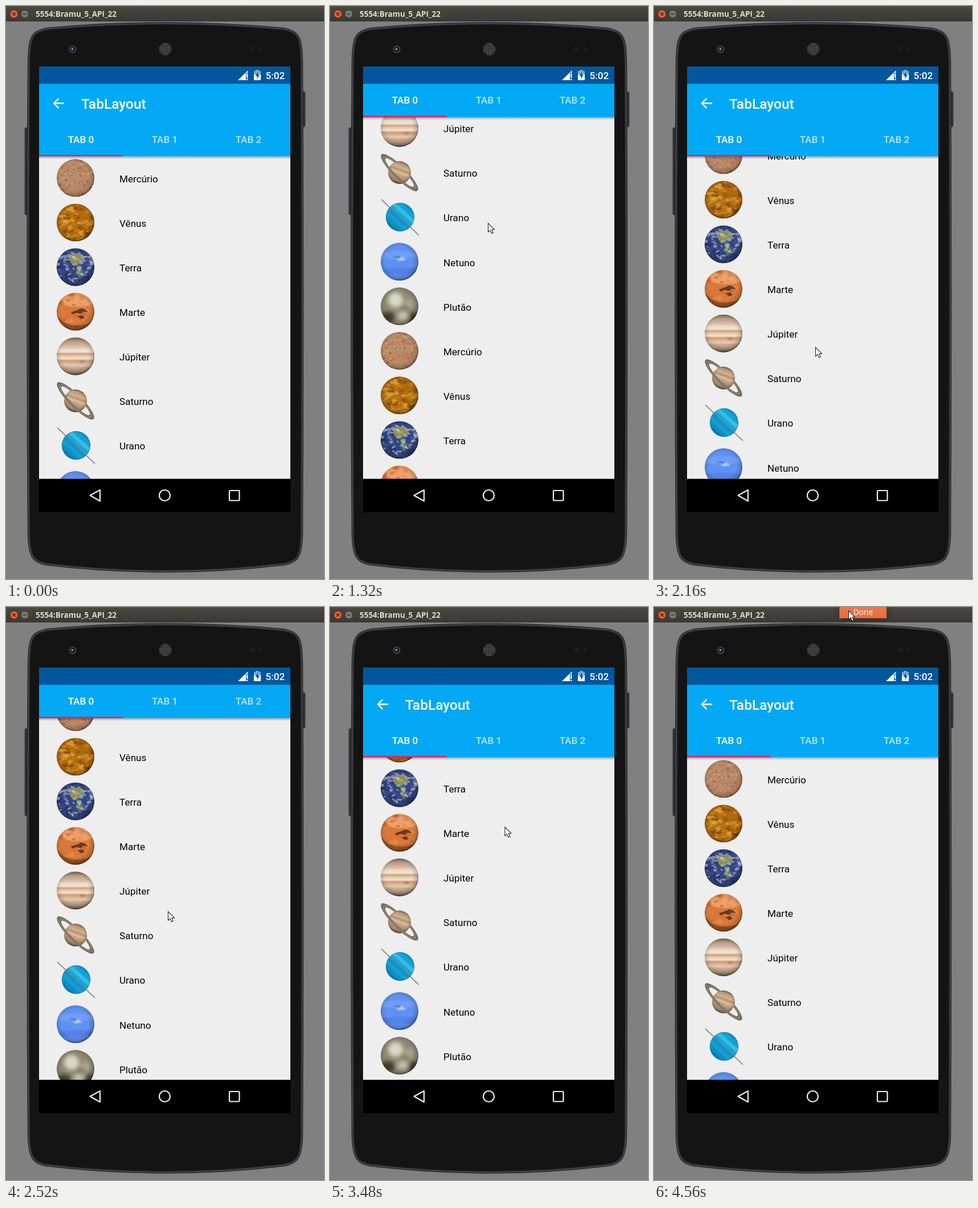
Animation of 558x1004 px, one loop 4680 ms. Source, as an HTML page:

```html
<!DOCTYPE html>
<html lang="pt">
<head>
<meta charset="utf-8">
<title>TabLayout</title>
<style>
  html, body { margin: 0; width: 100%; height: 100%; overflow: hidden; background: #808080; }
  svg { display: block; width: 100%; height: 100%; }
  text { font-family: Roboto, sans-serif; font-size: 17.15px; }
  .medium { font-weight: 500; fill: #fff; }
  .system { font-family: "Open Sans", sans-serif; }
</style>
</head>
<body>
<svg id="stage" viewBox="0 0 558 1004"></svg>
<script>
const STEP = 120, LOOP = 4680, ROW = 78.1, BAR = 68.6;
const names = ["Mercúrio", "Vênus", "Terra", "Marte", "Júpiter", "Saturno", "Urano", "Netuno", "Plutão"];

// Keys are [step, values...]; values between keys are linear.
const scrollKeys = [
  [7, 0], [8, -75.4], [9, -175], [10, -300], [11, -400], [12, -446], [13, -455.6], [14, -451],
  [15, -435], [16, -340], [17, -170], [18, -40], [19, 0], [20, -11], [21, -117], [22, -215],
  [23, -340], [24, -455], [25, -500.4], [26, -499], [27, -481], [28, -360], [29, -140], [30, 0]
];
const cursorKeys = [
  [1, 184, 632], [3, 309, 732], [5, 276, 725], [7, 273, 712], [8, 273, 617], [11, 277, 380],
  [12, 278, 348], [14, 280, 361], [15, 280, 378], [17, 282, 540], [19, 284, 655], [20, 284, 640],
  [21, 284, 533], [23, 291, 390], [25, 297, 352], [26, 298, 362], [27, 299, 380], [28, 303, 450],
  [30, 310, 320], [32, 321, 63], [34, 325, 30], [36, 318, 17], [38, 341, 6]
];
const glowKeys = [[29.9, 0], [30, 80], [31, 60], [32, 37], [33, 16], [34, 0]];

function sample(keys, n) {
  if (n <= keys[0][0]) return keys[0].slice(1);
  const i = keys.findIndex(k => k[0] >= n);
  if (i < 0) return keys[keys.length - 1].slice(1);
  const a = keys[i - 1], b = keys[i], f = (n - a[0]) / (b[0] - a[0]);
  return a.slice(1).map((v, j) => v + (b[j + 1] - v) * f);
}

function random(seed) {
  return () => (seed = (seed * 16807) % 2147483647) / 2147483647;
}

const circle = (x, y, r, attrs) => `<circle cx="${x}" cy="${y}" r="${r}" ${attrs}/>`;
const rect = (x, y, w, h, attrs) => `<rect x="${x}" y="${y}" width="${w}" height="${h}" ${attrs}/>`;
const path = (d, attrs) => `<path d="${d}" ${attrs}/>`;
const oval = (x, y, rx, ry, fill) => `<ellipse cx="${x}" cy="${y}" rx="${rx}" ry="${ry}" fill="${fill}"/>`;
const text = (x, y, s, attrs = "") => `<text x="${x}" y="${y}" ${attrs}>${s}</text>`;
const stops = list => list.map(([o, c, a = 1]) => `<stop offset="${o}" stop-color="${c}" stop-opacity="${a}"/>`).join("");
const vertical = (id, list) => `<linearGradient id="${id}" x2="0" y2="1">${stops(list)}</linearGradient>`;

// Soft blotches scattered over a disc.
function blotches(seed, count, size, colors) {
  const rnd = random(seed);
  let out = "";
  for (let i = 0; i < count; i++) {
    const a = rnd() * 6.283, d = 32 * Math.sqrt(rnd()), s = size * (.4 + rnd()), tilt = rnd() * 70 - 35;
    out += `<ellipse transform="translate(${(d * Math.cos(a)).toFixed(1)} ${(d * Math.sin(a)).toFixed(1)}) rotate(${tilt.toFixed()})"
      rx="${s.toFixed(1)}" ry="${(s * (.35 + rnd() * .5)).toFixed(1)}" fill="${colors[i % colors.length]}" opacity=".55"/>`;
  }
  return out;
}

function bands(r, list) {
  const h = 2 * r / list.length;
  return list.map((c, i) => rect(-r, -r + i * h, 2 * r, h + .5, `fill="${c}"`)).join("");
}

const globe = (base, detail, blur = "soft") =>
  `<g clip-path="url(#disc)">${circle(0, 0, 33.2, `fill="${base}"`)}
  <g filter="url(#${blur})">${detail}</g>${circle(0, 0, 33.2, 'fill="url(#limb)"')}</g>`;

// One half of a flat ring: far side with sweep 1, near side with sweep 0.
const halfRing = sweep => `<g transform="rotate(45)">` +
  path(`M-45 0A45 11 0 0 ${sweep} 45 0H35A35 7 0 0 ${1 - sweep}-35 0Z`, 'fill="#746a60"') +
  path(`M-39 0A39 9 0 0 ${sweep} 39 0`, 'fill="none" stroke="#94887a" stroke-width="1.5"') + `</g>`;

const planets = [
  globe("#ba8a67", blotches(11, 170, 2.2, ["#d9ae8b", "#8f5f44", "#c99874", "#a5734f"])),
  globe("#b06a10", blotches(29, 110, 4.2, ["#dd9a2c", "#7a4206", "#c77c14", "#ecb950", "#94530a"])),
  globe("#34457f",
    blotches(7, 30, 6, ["#222d62", "#4a5f9c"]) +
    path("M-13-20Q2-27 13-21L17-13 8-9 3-3-3-2-9-8Z", 'fill="#87905c"') +
    path("M1-2L8 0 15 6 11 15 6 20 3 10Z", 'fill="#66794f"') +
    oval(1, -14, 6, 3, "#b39a68") +
    blotches(53, 70, 3.2, ["#e6ebf4", "#a9b5d3", "#c8d1e4", "#33437d"])),
  globe("#d9783a",
    oval(4, -24, 34, 16, "#eda06a") +
    blotches(17, 50, 5, ["#e58f50", "#c56428", "#de8040"]) +
    path("M-34 4Q-22 24 2 24T34 12V35H-34Z", 'fill="#6b3014" opacity=".5"') +
    path("M-8 1L4-3 10-6 17-4 22 1 14 0 9 4 2 2-6 5ZM4 8L12 6 16 11 9 13Z", 'fill="#572b19" opacity=".85"')),
  globe("#d2ae90",
    bands(34, ["#84705f", "#a98e79", "#c4a68e", "#ceb199", "#dcc3ae", "#ecdccb", "#f0e4d6", "#d3a07c", "#e6cbb0",
      "#f0e2d3", "#d29a73", "#dcb393", "#e3c8b0", "#c9a88e", "#c0a08a", "#a58873", "#806a5b"]) +
    oval(12, 9, 6, 2.5, "#c47c55"), "band"),
  halfRing(1) + `<g transform="rotate(20)"><g clip-path="url(#small)">` +
    bands(20, ["#9a8268", "#bda080", "#cfae8c", "#bd9778", "#d6b896", "#c6a17f", "#b69172", "#a88c70", "#8a765f"]) +
    circle(0, 0, 20, 'fill="url(#limb)"') + `</g></g>` + halfRing(0),
  `<g transform="translate(1 0)"><g clip-path="url(#mid)"><g transform="rotate(42)" filter="url(#soft)">` +
    bands(26, ["#0f93c8", "#14a3d8", "#3abce4", "#18a5d8", "#1094c8", "#149fd4", "#0f8fc4", "#0b7cb0"]) +
    `</g></g>` + circle(0, 0, 24.7, 'fill="none" stroke="#075f8c" stroke-width=".6"') +
    path("M-33-31L33 32", 'stroke="#777f84" stroke-width="1.5"') + `</g>`,
  globe("#5f91f3",
    oval(-2, -12, 34, 7, "#709ef7") + oval(2, 16, 34, 6, "#5383e8") +
    path("M-8-6L6-7M-3-3L10-4", 'stroke="#e0eaff" stroke-width="1.8"') +
    oval(-4, -8, 7, 2, "#4675d6"), "band"),
  globe("#8d8972",
    circle(-7, -11, 13, 'fill="#dad7c6"') + circle(17, -4, 9, 'fill="#a8a48d"') +
    circle(6, 17, 9, 'fill="#c2beaa"') + oval(-20, 19, 12, 10, "#45412f") +
    oval(25, 20, 9, 10, "#423e2d") + oval(8, 4, 9, 4, "#777360"), "hazy")
];

function defs() {
  const clip = (id, r) => `<clipPath id="${id}">${circle(0, 0, r, "")}</clipPath>`;
  const blur = (id, s) => `<filter id="${id}" x="-30%" y="-30%" width="160%" height="160%"><feGaussianBlur stdDeviation="${s}"/></filter>`;
  return `<defs>` + clip("disc", 33.2) + clip("small", 20) + clip("mid", 24.8) +
    blur("soft", .7) + blur("band", 1.2) + blur("hazy", 3.5) + blur("shade", 6) +
    `<clipPath id="view">${rect(58, 136, 441, 693, "")}</clipPath>
    <radialGradient id="limb" cx=".48" cy=".46" r=".55">${stops([[.65, "#000", 0], [.88, "#000", .16], [1, "#000", .6]])}</radialGradient>` +
    vertical("chromeFill", [[0, "#555349"], [.12, "#48463f"], [1, "#3a3934"]]) +
    vertical("shadowFill", [[0, "#000", .32], [1, "#000", 0]]) +
    vertical("doneFill", [[0, "#ef774c"], [1, "#ee6b3e"]]) +
    planets.map((p, i) => `<g id="planet${i}">${p}</g>`).join("") + `</defs>`;
}

function windowBar() {
  return rect(0, 0, 558, 26.5, 'fill="url(#chromeFill)"') + rect(0, 26, 558, 1, 'fill="#33322e"') +
    circle(14, 14, 7.2, 'fill="#ea5b31" stroke="#2f2d29"') +
    path("M11.5 11.5L16.5 16.5M16.5 11.5L11.5 16.5", 'stroke="#4b251a" stroke-width="1.5"') +
    circle(33, 14, 7, 'fill="#7b7970" stroke="#2f2d29"') +
    path("M29.5 14H36.5", 'stroke="#393833" stroke-width="1.5"') +
    text(52, 19, "5554:Bramu_5_API_22", 'class="system" font-weight="700" style="font-size:13.5px" fill="#dfdbd2"');
}

function phone() {
  const body = "M40 100C41 55 44 46 72 40Q279 21 487 40C515 46 518 55 519 100Q521 510 519 925C518 965 511 974 488 978Q279 1003 70 978C48 974 41 965 40 925Q37 510 40 100Z";
  let mesh = "";
  for (let y = -9; y <= 9; y += 3)
    for (let x = -9; x <= 9; x += 3)
      if (x * x + y * y < 115) mesh += circle(279.5 + x, 75.5 + y, 1, 'fill="#6d6d6d"');
  return rect(33, 213, 7, 153, 'rx="2" fill="#2c2d32" stroke="#48494e"') +
    rect(518, 150, 7, 62, 'rx="2" fill="#2c2d32" stroke="#48494e"') +
    path(body, 'fill="#141414" stroke="#2b2c30" stroke-width="4.5"') +
    path(body, 'fill="none" stroke="#55565b" stroke-width="1"') +
    circle(117, 76, 6.5, 'fill="#4b4c51"') + circle(117, 76, 4.8, 'fill="#191a28"') +
    circle(116.5, 75.5, 2, 'fill="#6a70a0"') + circle(116, 75, .8, 'fill="#d4d6e2"') +
    circle(279.5, 75.5, 11.5, 'fill="#252525"') + mesh +
    circle(433, 75, 4.5, 'fill="#211b1c"') + circle(447, 75, 3.5, 'fill="#211b1c"');
}

function statusBar() {
  return rect(58, 106, 441, 30.3, 'fill="#02579c"') +
    path("M407 130L424.5 113V117H421V130Z", 'fill="#fff"') +
    path("M423.3 118V126M423.3 127.5V130", 'stroke="#fff" stroke-width="2.2"') +
    path("M438 112H444V114H447V121H435V114H438Z", 'fill="#7da9cc"') +
    rect(435, 120, 12, 10, 'fill="#fff"') +
    path("M442 115L437.5 122.5H440.5V128L445 120.5H442Z", 'fill="#02579c"') +
    text(455.5, 128, "5:02", 'class="medium"');
}

function navBar() {
  return rect(58, 828.5, 441, 58.5, 'fill="#000"') +
    `<g fill="none" stroke="#eee" stroke-width="2.2" stroke-linejoin="round">` +
    path("M147.5 857.5L165 848V867.5Z", "") + circle(278.5, 857.5, 9.5, "") +
    rect(392, 849, 17.5, 17.5, 'rx="1"') + `</g>`;
}

function appBar() {
  const tab = (i, alpha) => text(131.5 + 147 * i, 240, "TAB " + i, `class="medium" text-anchor="middle" fill-opacity="${alpha}"`);
  return `<g id="bar">` + rect(58, 263.4, 441, 5, 'fill="url(#shadowFill)"') +
    rect(58, 136, 441, 127.4, 'fill="#03a9f4"') +
    path("M102 170.5H84M92.5 162L84 170.5L92.5 179", 'fill="none" stroke="#fff" stroke-width="2.3"') +
    text(132, 180, "TabLayout", 'class="medium" style="font-size:24.5px"') +
    tab(0, 1) + tab(1, .7) + tab(2, .7) +
    rect(58, 260.9, 147, 2.5, 'fill="#e91e63"') + `</g>`;
}

function list() {
  let out = "";
  for (let i = 0; i < 16; i++) {
    const k = i % names.length, y = ROW * i;
    out += `<use href="#planet${k}" x="122" y="${301.3 + y}"/>` + text(199, 308.8 + y, names[k]);
  }
  return `<g id="list">${out}</g>`;
}

const stage = document.getElementById("stage");
stage.innerHTML = defs() + rect(0, 0, 558, 1004, 'fill="#808080"') + windowBar() + phone() +
  rect(58, 106, 441, 781, 'fill="#eee"') +
  `<g clip-path="url(#view)">${list()}<path id="glow" fill="#03a9f4"/>${appBar()}</g>` +
  statusBar() + navBar() +
  `<g id="done">` + rect(326, -6, 82, 25, 'fill="#000" opacity=".4" filter="url(#shade)"') +
  rect(325.5, -1, 82.5, 20.5, 'fill="url(#doneFill)" stroke="#c95428"') +
  text(367, 14, "Done", 'class="system" text-anchor="middle" style="font-size:13.8px" fill="#fff"') + `</g>` +
  `<g id="cursor">` + path("M.5.5V16L4 12.8L6.5 18.5L9.3 17.2L6.8 11.7H11.5Z", 'fill="#fff" stroke="#222" stroke-width="1.1"') + `</g>`;

const [listEl, barEl, glowEl, doneEl, cursorEl] =
  ["list", "bar", "glow", "done", "cursor"].map(id => document.getElementById(id));

// The bar takes up each scroll movement first, within its own height.
const bars = [0];
for (let n = 1; n < LOOP / STEP; n++) {
  const dy = sample(scrollKeys, n)[0] - sample(scrollKeys, n - 1)[0];
  bars[n] = Math.min(0, Math.max(-BAR, bars[n - 1] + dy));
}

const move = (el, x, y) => el.setAttribute("transform", `translate(${x} ${y})`);
const show = (el, on) => el.setAttribute("visibility", on ? "visible" : "hidden");

function render(ms) {
  const n = Math.floor((ms % LOOP) / STEP);
  move(listEl, 0, sample(scrollKeys, n)[0]);
  move(barEl, 0, bars[n]);
  move(cursorEl, ...sample(cursorKeys, n));
  show(cursorEl, n > 0);
  show(doneEl, n >= 36);
  const d = sample(glowKeys, n)[0], top = 263.4;
  glowEl.setAttribute("d", `M58 ${top}H499V${top + d * .62}Q278.5 ${top + d * 1.38} 58 ${top + d * .62}Z`);
  glowEl.setAttribute("opacity", d * .0033);
}

let start;
function tick(now) {
  start ??= now;
  render(now - start);
  requestAnimationFrame(tick);
}
render(0);
requestAnimationFrame(tick);
</script>
</body>
</html>
```
